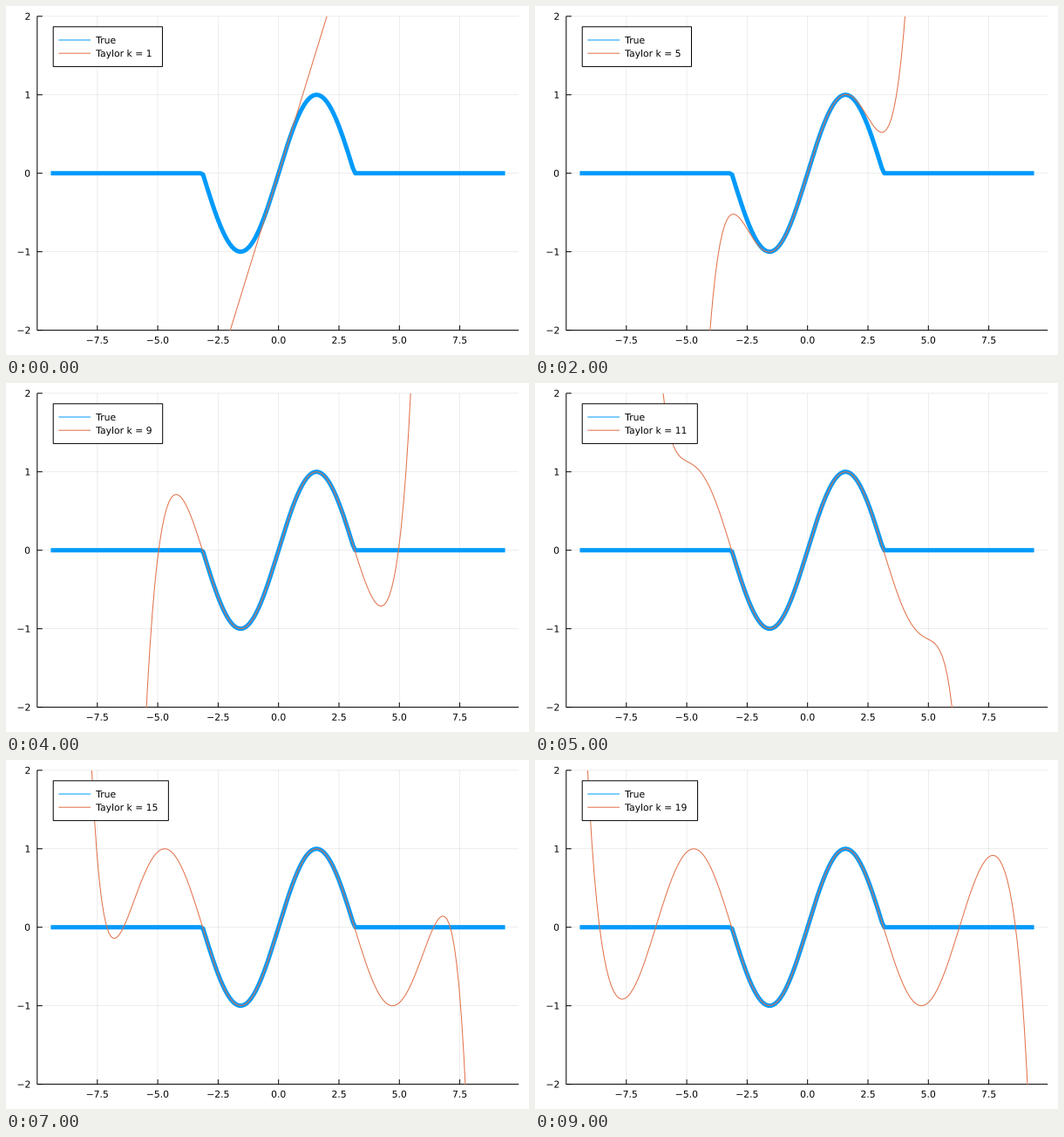
A matplotlib script for the animation above (9.5 s loop, 600 by 400 pixels).

```python
import math

import numpy as np
import matplotlib.pyplot as plt
from matplotlib.animation import FuncAnimation
from matplotlib.patches import PathPatch, Rectangle
from matplotlib.textpath import TextPath
from matplotlib.transforms import Affine2D

W, H, DPI = 600, 400, 100
PX = 72 / DPI
BLUE, ORANGE = "#009afa", "#e26f46"
LEFT, RIGHT, TOP, BOTTOM = 35.8, 588.2, 11.8, 371.6
FONT = {"family": "DejaVu Sans"}
FONT_SIZE = 10.8
CAP_HALF = 0.365 * FONT_SIZE
ORDERS = 19

x = -3 * math.pi + 0.1 * np.arange(189)
pad = 0.03 * (x[-1] - x[0])
x_min, x_max = x[0] - pad, x[-1] + pad


def to_x(v):
    return LEFT + (v - x_min) / (x_max - x_min) * (RIGHT - LEFT)


def to_y(v):
    return TOP + (2 - v) / 4 * (BOTTOM - TOP)


def taylor(k):
    return sum((-1) ** (n // 2) * x**n / math.factorial(n)
               for n in range(1, k + 1, 2))


fig = plt.figure(figsize=(W / DPI, H / DPI), dpi=DPI, facecolor="white")
ax = fig.add_axes([0, 0, 1, 1])
ax.set_xlim(0, W)
ax.set_ylim(H, 0)
ax.axis("off")


def line(xs, ys, color="black", width=1, z=2, **kw):
    return ax.plot(xs, ys, color=color, lw=width * PX, zorder=z, snap=False,
                   solid_capstyle="butt", solid_joinstyle="round", **kw)[0]


def text_path(s, px, py, align=None):
    """Outline of s centred vertically on py, aligned by its ink at px."""
    path = TextPath((0, 0), s, size=FONT_SIZE, prop=FONT)
    box = path.get_extents()
    shift = {"center": (box.x0 + box.x1) / 2, "right": box.x1}.get(align, 0)
    flip = Affine2D().scale(1, -1).translate(px - shift, py + CAP_HALF)
    return flip.transform_path(path)


def text(s, px, py, align=None, z=2):
    patch = PathPatch(text_path(s, px, py, align), fc="black", lw=0,
                      zorder=z, snap=False)
    return ax.add_patch(patch)


# Grid, ticks and axes
for v in np.arange(-7.5, 8, 2.5):
    px = to_x(v)
    line([px, px], [TOP, BOTTOM], width=0.7, z=1, alpha=0.1)
    line([px, px], [BOTTOM, BOTTOM - 5.5])
    text(f"{v:.1f}".replace("-", "\u2212"), px, 382.8, "center")
for v in range(-2, 3):
    py = to_y(v)
    line([LEFT, RIGHT], [py, py], width=0.7, z=1, alpha=0.1)
    line([LEFT, LEFT + 6], [py, py])
    text(str(v).replace("-", "\u2212"), 27.3, py, "right")
line([LEFT, LEFT], [TOP, BOTTOM])
line([LEFT, RIGHT], [BOTTOM, BOTTOM])

# Curves
frame = Rectangle((LEFT, TOP), RIGHT - LEFT, BOTTOM - TOP,
                  transform=ax.transData)
true_y = np.where(np.abs(x) <= math.pi, np.sin(x), 0)
line(to_x(x), to_y(true_y), BLUE, 5, 3)
series = line(to_x(x), to_y(taylor(1)), ORANGE, 1, 4)
series.set_clip_path(frame)

# Legend
BOX_X, BOX_Y, ROW, TEXT_X = 54.2, 23.8, 15.2, 103.2
box = Rectangle((BOX_X, BOX_Y), 126.5, 3 * ROW, fc="white", ec="black",
                lw=PX, zorder=5, snap=False)
ax.add_patch(box)
for row, color in enumerate((BLUE, ORANGE), 1):
    py = BOX_Y + row * ROW
    line([60.3, 97], [py, py], color, 1, 6)
text("True", TEXT_X, BOX_Y + ROW, z=6)
label = text("Taylor k = 1", TEXT_X, BOX_Y + 2 * ROW, z=6)


def update(i):
    k = i + 1
    series.set_ydata(to_y(taylor(k)))
    path = text_path(f"Taylor k = {k}", TEXT_X, BOX_Y + 2 * ROW)
    label.set_path(path)
    box.set_width(path.get_extents().x1 + 12.9 - BOX_X)
    return series, label, box


anim = FuncAnimation(fig, update, frames=ORDERS, interval=500, repeat=True,
                     repeat_delay=0, blit=False)
plt.show()
```
